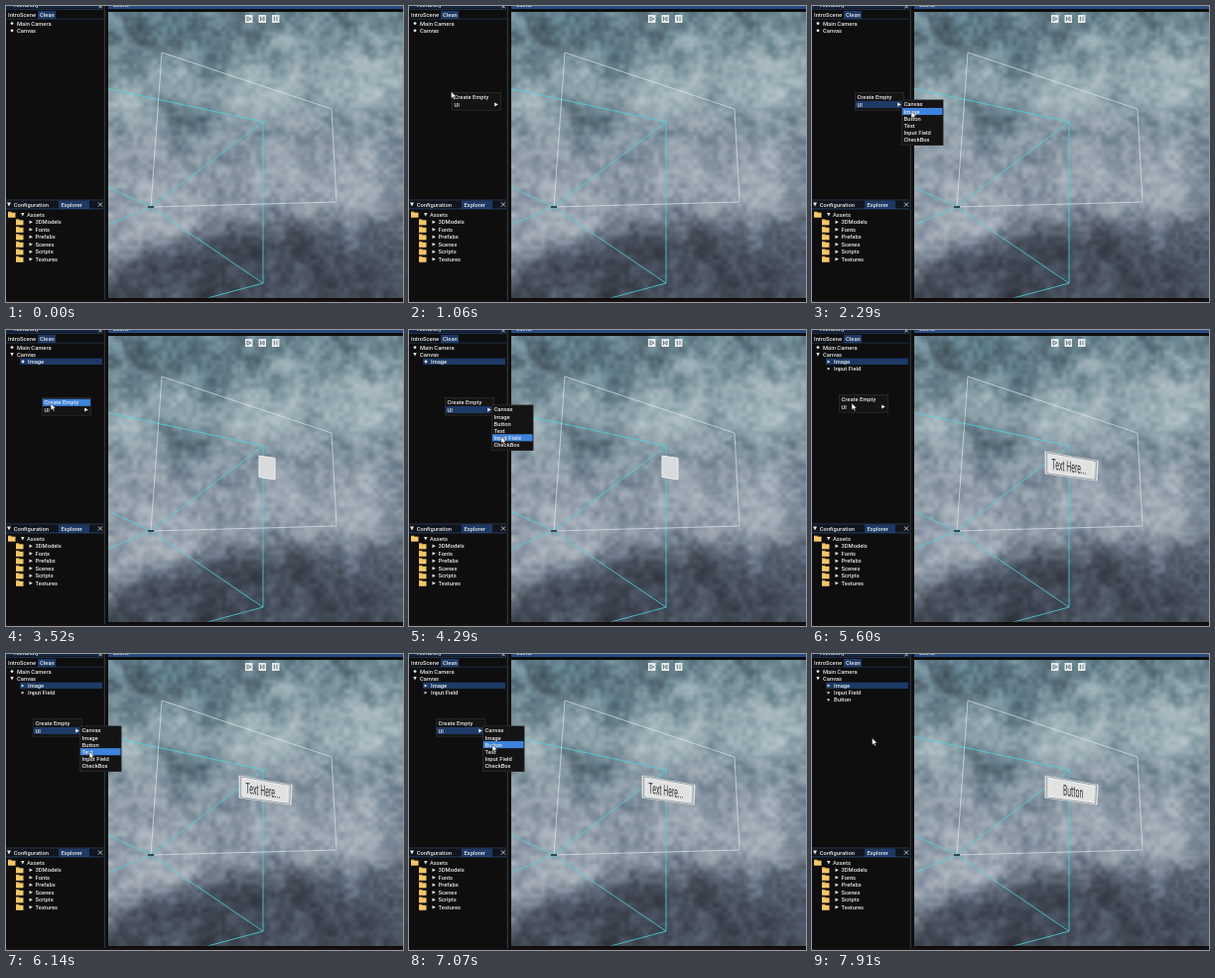
Write an HTML page with a canvas that moves like this. It is 400 by 299 pixels and loops after 7.99 s.

```html
<!DOCTYPE html>
<html lang="en">
<head>
<meta charset="utf-8">
<title>Scene editor</title>
<style>
  html, body { margin: 0; width: 100%; height: 100%; overflow: hidden; background: #0e0e0f; }
  canvas { display: block; width: 400px; height: 299px; }
</style>
</head>
<body>
<canvas id="stage"></canvas>
<script>
const W = 400, H = 299, LOOP = 7990, STEP = 76.9, STEP_OFFSET = 60;
const VIEW = [103, 6, 297, 288.5];
const FONT = '500 5.8px Roboto, "Open Sans", sans-serif';
const NAVY = '#1d3a66', HOVER = '#3d83dd', CYAN = '#4cd6e2', INK = '#e6e6e6';
const SUBMENU = ['Canvas', 'Image', 'Button', 'Text', 'Input Field', 'CheckBox'];
const FOLDERS = ['3DModels', 'Fonts', 'Prefabs', 'Scenes', 'Scripts', 'Textures'];
const ROW = 7.1, UI_TIME = 450, CROSS_TIME = 700, EXPAND_TIME = 300;

// Each visit: reach the menu, leave its corner for "UI", cross over, rest on rows, click, move away
const MENUS = [
  { x: 43, y: 87, arrive: 980, open: 1055, leave: 1290, rows: [[2290, 1]], click: 2365, away: [2600, 99, 107] },
  { x: 36, y: 68, arrive: 2985, open: 3285, leave: 3290, rows: [[4330, 4]], click: 4360, away: [4910, 106, 109] },
  { x: 27, y: 65, arrive: 5220, open: 5285, leave: 5300, rows: [[6140, 3], [6600, 5], [7070, 2]], click: 7675, away: [7910, 60.5, 85] }
];
const [IMAGE_AT, INPUT_AT, BUTTON_AT] = MENUS.map(m => m.click);
const rowCenter = (menu, row) => menu.y + 12.4 + row * ROW;

const PATH = [[290, 350, 293], ...MENUS.flatMap(m => {
  const corner = [m.x - 0.5, m.y - 0.5];
  const last = m.rows[m.rows.length - 1];
  return [
    [m.arrive, ...corner], [m.leave, ...corner],
    [m.leave + UI_TIME, m.x + 18, m.y + 12.4],
    [m.leave + CROSS_TIME, m.x + 56, m.y + 12.4],
    ...m.rows.map(([time, row]) => [time, m.x + 57, rowCenter(m, row)]),
    [m.click, m.x + 57, rowCenter(m, last[1])],
    m.away
  ];
})];

const canvas = document.getElementById('stage');
const dpr = window.devicePixelRatio || 1;
canvas.width = W * dpr;
canvas.height = H * dpr;
let ctx = canvas.getContext('2d');

function rect(x, y, w, h, fill) {
  ctx.fillStyle = fill;
  ctx.fillRect(x, y, w, h);
}

function poly(points, fill, stroke, width = 0.8) {
  ctx.beginPath();
  points.forEach(([x, y]) => ctx.lineTo(x, y));
  ctx.closePath();
  if (fill) { ctx.fillStyle = fill; ctx.fill(); }
  if (stroke) { ctx.strokeStyle = stroke; ctx.lineWidth = width; ctx.stroke(); }
}

function line([x1, y1], [x2, y2], color, width = 0.8) {
  ctx.beginPath();
  ctx.moveTo(x1, y1);
  ctx.lineTo(x2, y2);
  ctx.strokeStyle = color;
  ctx.lineWidth = width;
  ctx.stroke();
}

function label(text, x, y) {
  ctx.font = FONT;
  ctx.textBaseline = 'middle';
  ctx.fillStyle = INK;
  ctx.fillText(text, x, y + 0.3);
}

function ellipse(x, y, rx, ry, fill) {
  ctx.beginPath();
  ctx.ellipse(x, y, rx, ry, 0, 0, 7);
  ctx.fillStyle = fill;
  ctx.fill();
}

const dot = (x, y) => ellipse(x, y, 1.4, 1.4, INK);
const arrowRight = (x, y, r = 1.7) => poly([[x - r, y - r], [x + r, y], [x - r, y + r]], INK);
const arrowDown = (x, y, r = 1.7) => poly([[x - r, y - r], [x + r, y - r], [x, y + r]], INK);

function cross(x, y, r) {
  line([x - r, y - r], [x + r, y + r], INK);
  line([x + r, y - r], [x - r, y + r], INK);
}

function folder(x, y) {
  rect(x, y - 3, 3.4, 2, '#e5a93b');
  rect(x, y - 2, 7.5, 5, '#f3c765');
}

function clipToView() {
  ctx.beginPath();
  ctx.rect(...VIEW);
  ctx.clip();
}

function gradient(top, bottom, colors) {
  const g = ctx.createLinearGradient(0, top, 0, bottom);
  colors.forEach((color, i) => g.addColorStop(i / (colors.length - 1), color));
  return g;
}

let seed = 11;
const random = () => (seed = seed * 16807 % 2147483647) / 2147483647;

function noise(cell) {
  const tile = document.createElement('canvas');
  tile.width = tile.height = Math.ceil(VIEW[2] / cell);
  const pen = tile.getContext('2d');
  for (let i = 0; i < tile.width ** 2; i++) {
    pen.fillStyle = `hsl(0 0% ${random() * 100}%)`;
    pen.fillRect(i % tile.width, Math.floor(i / tile.width), 1, 1);
  }
  return tile;
}

function makeSky() {
  const layer = document.createElement('canvas');
  layer.width = canvas.width;
  layer.height = canvas.height;
  const main = ctx;
  ctx = layer.getContext('2d');
  ctx.scale(dpr, dpr);
  clipToView();
  rect(...VIEW, gradient(6, 294, ['#6c8690', '#8398a1', '#8b99a5', '#8d99a6', '#8d99a6']));

  ctx.filter = 'blur(9px)';
  [[165, 18, 40, 20], [205, 50, 20, 26], [190, 112, 26, 14]]
    .forEach(shade => ellipse(...shade, 'rgba(66,92,104,0.6)'));
  [[122, 97, 32, 17], [170, 70, 24, 14], [262, 85, 36, 26], [355, 80, 44, 26]]
    .forEach(puff => ellipse(...puff, 'rgba(184,200,205,0.6)'));

  // Storm bank along the bottom, lower on the left
  const bank = [[420, 330], [80, 330]];
  for (let x = 80; x <= 420; x += 4) {
    bank.push([x, 208 + 62 * Math.exp((103 - x) / 75) + 5 * Math.sin(x / 13)]);
  }
  poly(bank, gradient(205, 294, ['#687380', '#4a5461', '#404855', '#444d59']));
  ctx.filter = 'none';

  ctx.globalCompositeOperation = 'overlay';
  ctx.globalAlpha = 0.16;
  [40, 20, 10, 5].forEach(cell => ctx.drawImage(noise(cell), ...VIEW));
  ctx = main;
  return layer;
}

const sky = makeSky();

function drawPanels(t) {
  rect(0, 0, W, H, '#0e0e0f');
  rect(0, 0, 98, 2.5, '#172640');
  rect(103, 0, 297, 3, '#274a80');
  label('Hierarchy', 8, -1);
  label('Scene', 108, -0.8);
  cross(95, 0.5, 1.7);
  rect(0, 3, 98, 0.6, '#28456f');
  rect(32, 5, 18, 8, NAVY);
  label('IntroScene', 2, 9);
  label('Clean', 34, 9);
  rect(0, 12.8, 98, 0.6, '#29425f');
  rect(98.8, 0, 0.9, H, '#3b414b');

  const items = [];
  if (t >= IMAGE_AT) items.push('Image');
  if (t >= INPUT_AT) items.push('Input Field');
  if (t >= BUTTON_AT) items.push('Button');
  dot(6, 17.6);
  label('Main Camera', 11, 17.6);
  (items.length ? arrowDown : dot)(6, 24.8);
  label('Canvas', 11, 24.8);
  items.forEach((name, i) => {
    const y = 32 + i * ROW;
    if (i === 0) rect(14, 28.6, 83, 6.4, NAVY);
    if (items.length === 1) dot(17, y);
    else arrowRight(17, y, 1.4);
    label(name, 22, y);
  });

  rect(0, 196, 98, 9, '#10151d');
  rect(53, 196.5, 31, 8.5, NAVY);
  rect(0, 195.6, 98, 0.7, '#34455c');
  rect(0, 204.6, 98, 0.7, '#2c4f83');
  arrowDown(3, 200.5, 2);
  label('Configuration', 7.8, 200.5);
  label('Explorer', 55.5, 200.5);
  cross(95, 200.5, 2.1);

  folder(2, 210.7);
  arrowDown(16.8, 210.7);
  label('Assets', 21, 210.7);
  FOLDERS.forEach((name, i) => {
    const y = 218.3 + i * 7.5;
    folder(10, y);
    arrowRight(25.2, y);
    label(name, 29.5, y);
  });
  rect(0, 297, W, 2, '#171114');

  // Splitter lights up while the pointer rests on it
  if (t >= IMAGE_AT + STEP && t < MENUS[0].away[0] + STEP) rect(99.5, 0, 3, H, '#3a5f96');
}

function drawToolbar() {
  const ink = '#526069';
  [241, 254.5, 268].forEach((x, i) => {
    const bar = dx => line([x + dx, 10.8], [x + dx, 15.2], ink);
    rect(x, 9, 7.5, 8, '#e4eaec');
    if (i === 0) poly([[x + 2, 11], [x + 5.8, 13], [x + 2, 15]], null, ink);
    if (i === 1) {
      bar(2);
      poly([[x + 5.5, 11], [x + 3, 13], [x + 5.5, 15]], null, ink);
    }
    if (i === 2) [2.4, 5].forEach(bar);
  });
}

function drawScene(t) {
  const eye = [146, 203], top = [259, 117], bottom = [259, 280];
  ctx.drawImage(sky, 0, 0, W, H);
  ctx.save();
  clipToView();
  [top, bottom, [103, 183], [103, 221]].forEach(end => line(eye, end, CYAN));
  line([103, 83.5], top, CYAN);
  line(top, bottom, CYAN);
  line(bottom, [203, 295], CYAN);
  poly([[157, 47], [328, 104], [333, 198], eye], null, 'rgba(230,236,238,0.85)', 0.75);
  rect(143, 202, 6, 2, '#2b4a52');
  ctx.restore();

  if (t >= BUTTON_AT) drawField('Button', 253, 142.5);
  else if (t >= INPUT_AT) drawField('Text Here...', 241.5, 140.5);
  else if (t >= IMAGE_AT) poly([[255, 127], [271, 129.5], [271, 151], [255, 148.5]], '#d8dadb', '#f0f2f2', 1);
  drawToolbar();
}

function drawField(text, x, y) {
  const frame = [[235, 123], [288, 132.5], [287, 152], [235, 145]];
  const inset = amount => frame.map(([px, py]) => [px + (261 - px) * amount, py + (138 - py) * amount]);
  poly(frame, '#d9dcdc', '#f2f4f4');
  poly(inset(0.05), null, '#6d7478', 0.6);
  poly(inset(0.16), '#e0e2e2', '#f7f7f7', 0.6);
  if (text === 'Button') inset(0.3).forEach((p, i) => line(inset(0.08)[i], p, '#fff', 0.6));

  // Lettering foreshortened by the tilted plane
  ctx.save();
  ctx.transform(0.46, 0.07, 0, 1, x, y);
  ctx.font = '15px Roboto, sans-serif';
  ctx.textBaseline = 'alphabetic';
  ctx.fillStyle = '#303335';
  ctx.fillText(text, 0, 0);
  ctx.restore();
}

function panel(x, y, w, h) {
  rect(x, y, w, h, '#323236');
  rect(x + 0.6, y + 0.6, w - 1.2, h - 1.2, '#141415');
}

function drawMenu({ x, y, leave }, t, [cx, cy]) {
  const expanded = t >= leave + EXPAND_TIME;
  const item = (name, left, center, width, idle) => {
    const top = center - ROW / 2;
    const hovered = cx > left && cx < left + width && cy > top && cy < top + ROW;
    if (hovered || idle) rect(left, top, width, ROW, hovered ? HOVER : idle);
    label(name, left + 1.5, center);
  };
  panel(x, y, 50, 18.5);
  item('Create Empty', x + 1, y + 5.3, expanded ? 46 : 48);
  item('UI', x + 1, y + 12.5, expanded ? 46 : 48, expanded && NAVY);
  arrowRight(x + 45, y + 12.5, 1.9);
  if (!expanded) return;
  panel(x + 47, y + 7.5, 42.5, 46.5);
  SUBMENU.forEach((name, i) => item(name, x + 48, rowCenter({ y }, i), 40.5));
}

function cursorAt(t) {
  const i = PATH.findIndex(([time]) => time > t);
  if (i < 0) return PATH[PATH.length - 1].slice(1);
  const [t0, x0, y0] = PATH[i - 1], [t1, x1, y1] = PATH[i];
  const p = (t - t0) / (t1 - t0), e = p * p * (3 - 2 * p);
  return [x0 + (x1 - x0) * e, y0 + (y1 - y0) * e];
}

function drawCursor([x, y]) {
  const shape = [[0, 0], [0, 6.8], [1.6, 5.4], [2.8, 7.9], [3.9, 7.4], [2.8, 5], [4.9, 4.8]];
  poly(shape.map(([dx, dy]) => [x + dx, y + dy]), '#fff', '#222', 0.5);
}

function draw(now) {
  const time = now % LOOP;
  const t = STEP_OFFSET + STEP * Math.floor((time - STEP_OFFSET) / STEP + 0.05);
  ctx.setTransform(dpr, 0, 0, dpr, 0, 0);
  drawPanels(t);
  drawScene(t);
  if (t >= PATH[0][0]) {
    const cursor = cursorAt(t);
    MENUS.filter(m => t >= m.open && t < m.click).forEach(m => drawMenu(m, t, cursor));
    drawCursor(cursor);
  }
  requestAnimationFrame(draw);
}
requestAnimationFrame(draw);
</script>
</body>
</html>
```
